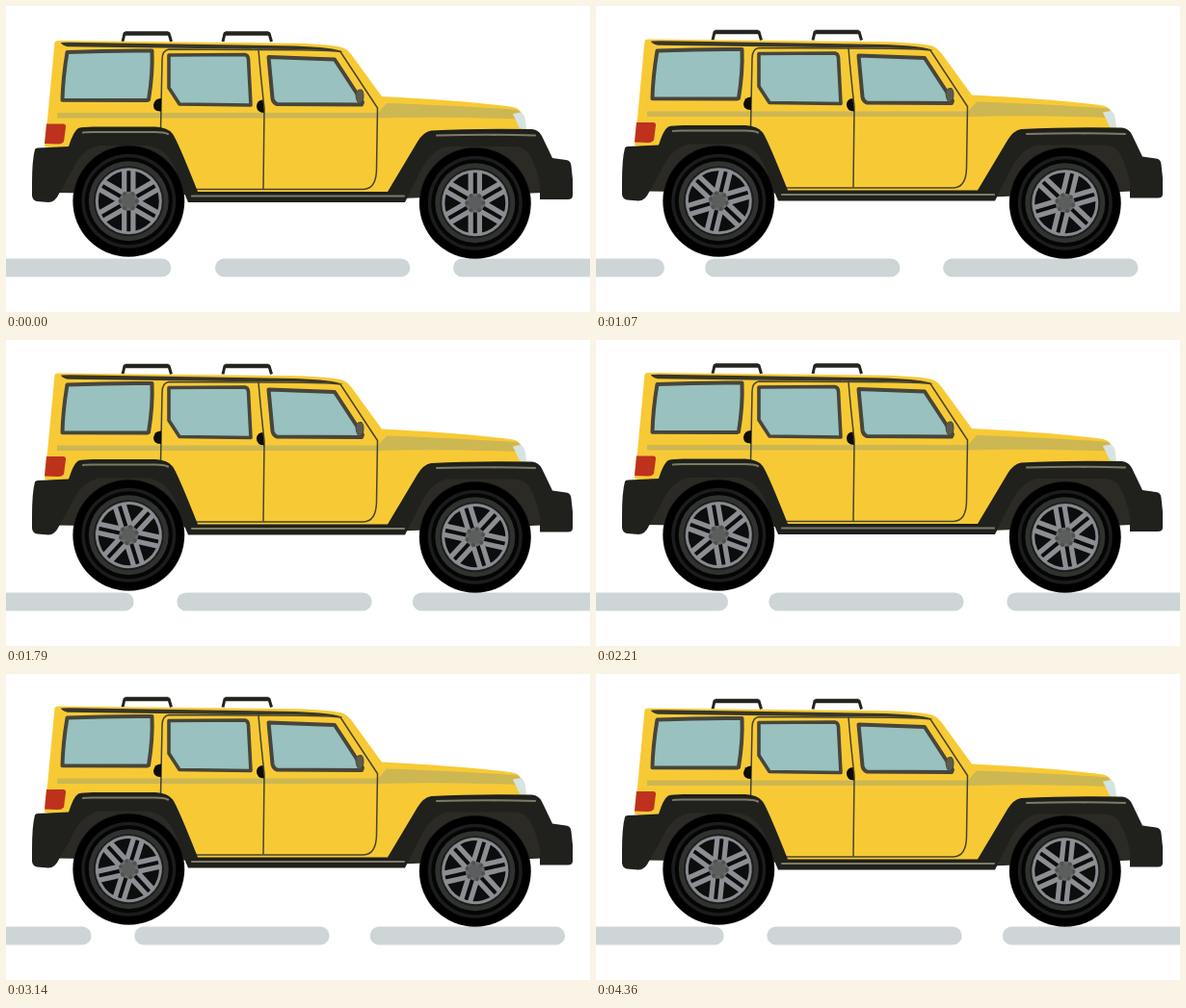
Write an HTML page that moves like this. It is 606 by 318 pixels and loops after 4430 ms.

```html
<!DOCTYPE html>
<html lang="en">
<head>
<meta charset="utf-8">
<title>Yellow off-roader</title>
<style>
  html, body { margin: 0; width: 100%; height: 100%; overflow: hidden; background: #fff; }
  svg { display: block; width: 606px; height: 318px; }
  .dark { fill: #20211c; }
  .arch { fill: #2c2a25; }
  .glass { fill: #98c1bf; stroke: #47453b; stroke-linejoin: round; }
  .seam { fill: none; stroke: #47432c; stroke-width: 1.5; }
  .shine { fill: none; stroke: #7f7a67; stroke-width: 2.2; stroke-linecap: round; }
  .band { fill: #cdb752; }
  .rack { fill: none; stroke: #26241f; stroke-linejoin: round; }
  .dash { fill: #cdd5d6; }
</style>
</head>
<body>
<svg viewBox="0 0 606 318">
  <defs>
    <g id="rack">
      <path class="rack" stroke-width="3" d="M1.500 11 L3.500 2.500 H49.500 L52 11"/>
      <path class="rack" stroke-width="4.500" d="M4 2.500 H49"/>
    </g>
    <g id="tyre">
      <circle r="58" fill="#1a1b1a"/>
      <circle r="57.300" fill="#000"/>
      <circle r="49" fill="#1b1c1b"/>
      <circle r="45.500" fill="#050505"/>
      <circle r="41.500" fill="#30322f"/>
      <circle r="36.500" fill="#1c1d1c"/>
    </g>
  </defs>

  <g id="road"></g>

  <g id="body">
    <use href="#rack" x="119.500" y="26"/>
    <use href="#rack" x="223.500" y="26"/>
    <path fill="#f7ca35" d="M50.500 38 Q51 36 55 36 L300 38.800 Q338 39.800 350 43.500 Q354 45 358 50
      L390 94 Q480 98.500 526 105 Q533 106.500 535 112 L540 128 L548 140 L420 198 H190 L60 150 L40 146
      Q41 128 43 118 Z"/>
    <path fill="#38362b" d="M57 38 L66 37.800 L300 41.500 Q340 43 350 47.500 L340 46.500 Q310 44.500 262 44.700
      L64 42.300 Q58 41 57 38 Z"/>
    <path class="band" d="M53 111 H386 L395 101 Q480 104 531 108 Q535 111 536 114 L526 113
      L529 117.500 Q450 114.500 386 116.500 H53 Z"/>

    <path class="seam" d="M160.500 128 L162 56 Q162 46 169 45 L262 45.500 Q264 70 268 106 L267 190"/>
    <path class="seam" d="M262 45.500 Q330 45.500 347 47.500 L385.500 106 L384.500 170 Q384 190 371 190.500 H196"/>

    <g class="glass">
      <path stroke-width="4" d="M63.500 48 Q110 46 151.500 46.500 Q152.500 70 148 97.300 L146 98 L58.500 97.800
        Q59 75 63.500 48 Z"/>
      <path stroke-width="3.600" d="M169 51 L248 50.500 Q251 51 251.500 55 L254 103 L180 102 L169 85 Z"/>
      <path stroke-width="4" d="M272.500 53 L341 55.500 L370 100 L369 102.500 L281 102 Q277 100 276.500 96 Z"/>
    </g>
    <path fill="#5c5b4d" stroke="#47453b" d="M363 91 Q364 86.500 369 87 Q372 90 370.500 98 L367 102 Q363 99 363 91 Z"/>
    <path fill="#0c0c09" d="M161 97 V109.500 Q153 110 153 103 Q154 96 161 96 Z"/>
    <path fill="#0c0c09" d="M266.500 97.500 L268 111 Q260 110.500 260 104 Q260.500 97.500 266.500 97.500 Z"/>

    <path fill="#be321d" d="M42 122.500 H60 Q62.500 123 62 126 L60 141 Q58 143.500 54 143.500 L40 143 Z"/>
    <path fill="#d5e4e3" d="M526 112 L534 110.500 Q538 112 539 119 Q540 125 539.500 128.500 L533 127 Z"/>

    <path class="arch" d="M50 194 L78 134 H160 L190 196 Z"/>
    <path class="arch" d="M410 200 L442 136 H545 L557 194 Z"/>
    <path class="dark" d="M27 185 Q27 160 30 149 Q30.500 147.500 33 147.500 L65 146 Q70 130 75 127
      Q80 125.500 90 125.500 H155 Q168 126 173 133 Q178 140 199 193 H396 L427 141 Q433 131 441 129.500
      Q490 127 546 128 Q553 129 556 135 L567 158 L581 160 Q586 160.500 586.500 166 L588 180 V197
      Q588 201 583 201 H554 V186 Q552 170 543 154 Q538 146 526 146 H457 Q441 150 430 172 L414 204 H189
      Q183 190 176 170 Q166 146 145 145 H96 Q80 149 72 164 Q66 176 55 195 Q51 204 44 204
      L32 203 Q27.500 202 27 197 Z"/>
    <path class="shine" d="M80 131.500 Q82 131 90 131 H155 Q164 131 168 133"/>
    <path class="shine" d="M447 134.500 Q500 133 549 134.500"/>
    <path class="shine" d="M193 197.500 H413"/>
  </g>

  <g id="wheels"></g>
</svg>
<script>
  const NS = 'http://www.w3.org/2000/svg';
  const LOOP = 4430, SHOTS = 62, RATE = 0.56;
  const DASHES = [-31, 217, 464, 708.5, 955.5];
  const ROAD_STEPS = 32, ROAD_SPEED = 22.05;
  const BOB_STEPS = 12, BOB_HEIGHT = 3;
  const SPIN = 360 / 31;

  const $ = id => document.getElementById(id);
  function add(parent, tag, attrs) {
    const el = document.createElementNS(NS, tag);
    for (const key in attrs) el.setAttribute(key, attrs[key]);
    return parent.appendChild(el);
  }

  for (const x of DASHES)
    add($('road'), 'rect', { class: 'dash', x, y: 262.5, width: 202.3, height: 19, rx: 9.5 });

  function makeWheel(x, y) {
    const wheel = add($('wheels'), 'g', { transform: `translate(${x} ${y})` });
    add(wheel, 'use', { href: '#tyre' });
    const rim = add(wheel, 'g', {});
    add(rim, 'circle', { r: 33, fill: '#0c0d0c', stroke: '#868a8f', 'stroke-width': 3 });
    for (let a = 0; a < 360; a += 60)
      add(rim, 'path', { d: 'M-4.6 -5V-33M4.6 -5V-33', stroke: '#8b8f94', 'stroke-width': 5.2,
        transform: `rotate(${a})` });
    add(rim, 'circle', { r: 10, fill: '#666a6b' });
    for (let a = 30; a < 360; a += 60)
      add(rim, 'circle', { cy: -8.5, r: 2.2, fill: '#505351', transform: `rotate(${a})` });
    add(rim, 'circle', { r: 7, fill: '#5b5e5c' });
    return rim;
  }
  const rims = [makeWheel(127.3, 202.7), makeWheel(486.8, 204.7)];

  // The motion runs in 40 ms steps, of which every shot picks the nearest.
  function draw(ms) {
    const shot = Math.floor((ms % LOOP + 6) * SHOTS / LOOP) % SHOTS;
    const step = Math.floor((shot + 0.5) / RATE);
    const bob = 1 - Math.abs(1 - (step % BOB_STEPS) / (BOB_STEPS / 2));
    $('road').setAttribute('transform', `translate(${-ROAD_SPEED * (step % ROAD_STEPS)})`);
    $('body').setAttribute('transform', `translate(0 ${-BOB_HEIGHT * bob})`);
    for (const rim of rims) rim.setAttribute('transform', `rotate(${step * SPIN % 360})`);
  }

  const start = performance.now();
  function tick() {
    draw(performance.now() - start);
    requestAnimationFrame(tick);
  }
  draw(0);
  requestAnimationFrame(tick);
</script>
</body>
</html>
```
